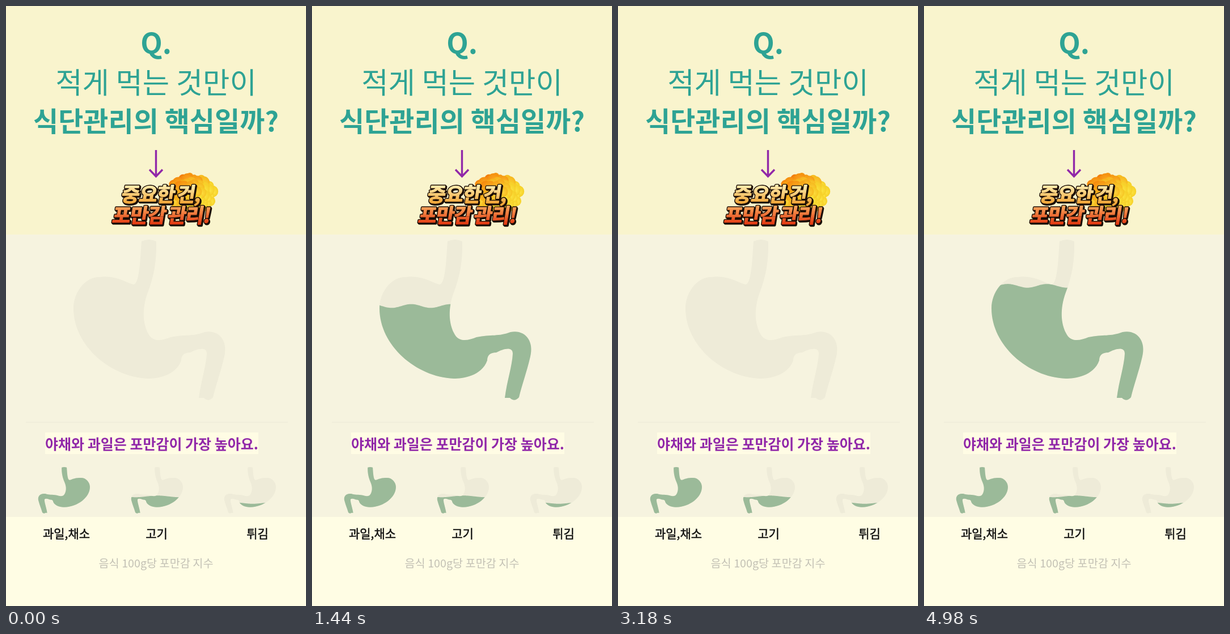
An HTML page with a canvas that plays this animation: 529 by 1058 pixels, repeating every 5.01 s.

```html
<!DOCTYPE html>
<html lang="ko">
<head>
<meta charset="utf-8">
<style>
html, body { margin: 0; width: 100%; height: 100%; overflow: hidden; background: #fffde4; }
canvas { display: block; width: 529px; height: 1058px; }
</style>
</head>
<body>
<canvas id="stage" width="529" height="1058"></canvas>
<script>
const W = 529, H = 1058, LOOP = 5010, STEP = 30;
const RESTART = 3060, PERIOD = 3150;
const ctx = document.getElementById('stage').getContext('2d');
const FONT = '"Noto Sans CJK KR", "Noto Sans CJK", "Noto Sans CJK JP", sans-serif';
const GREEN = '#9bba99', PALE = '#eeebd8', TEAL = '#2ea394', PURPLE = '#9128a9', INK = '#111';

// Oesophagus, inner bend, duodenum, underside, then back up the left wall
const stomach = new Path2D(`M239 415 Q252 409 265 415
  C266 450 260 480 250 505 C239 535 242 560 250 576
  C258 594 275 590 290 584 C315 579 330 583 350 575
  C375 570 392 590 385 618 C378 648 371 665 365 690
  Q357 699 349 691 L340 691 C344 660 353 635 354 613
  C354 600 338 604 325 611 Q309 611 309 625
  C299 653 265 657 250 657 C183 654 119 598 119 533
  C119 505 140 477 165 478 C195 474 215 490 225 491
  C236 490 237 440 239 415 Z`);

function box(g, x, y, w, h, color) {
  g.fillStyle = color;
  g.fillRect(x, y, w, h);
}

function text(g, str, y, size, weight, color, x = W / 2) {
  g.font = `${weight} ${size}px ${FONT}`;
  g.textAlign = 'center';
  g.fillStyle = color;
  g.fillText(str, x, y);
}

// Regular lettering with a hairline edge, for a medium weight
function label(g, str, x) {
  text(g, str, 938, 21, 400, INK, x);
  g.strokeStyle = INK;
  g.lineWidth = 0.5;
  g.strokeText(str, x, 938);
}

// Fills the stomach below a surface given as y(x)
function fillBelow(g, surface) {
  g.save();
  g.clip(stomach);
  g.beginPath();
  g.moveTo(100, 720);
  for (let x = 100; x <= 400; x += 2) g.lineTo(x, surface(x));
  g.lineTo(400, 720);
  g.fillStyle = GREEN;
  g.fill();
  g.restore();
}

// Small mirrored stomach; only the part left of `limit` takes the fill
function icon(g, x, surface, limit = 400) {
  g.save();
  g.translate(x + 91, 813);
  g.scale(-0.341, 0.289);
  g.translate(-119, -412);
  g.fillStyle = PALE;
  g.fill(stomach);
  g.beginPath();
  g.rect(100, 400, limit - 100, 320);
  g.clip();
  fillBelow(g, surface);
  g.restore();
}

function seeded(seed) {
  return () => (seed = seed * 16807 % 2147483647) / 2147483647;
}

// Cloud of fire: orange at the upper left, yellow at the lower right
function blast(g) {
  const rand = seeded(11), count = 70;
  for (let i = count; i > 0; i--) {
    const dist = Math.sqrt(i / count), angle = i * 2.4;
    const x = 327 + 38 * dist * Math.cos(angle), y = 332 + 32 * dist * Math.sin(angle);
    const r = 6 + 5 * rand();
    const heat = Math.max(0, Math.min(1, (x - 290) / 90 + (y - 300) / 75 + (rand() - 0.5) * 0.4));
    const hue = 26 + 23 * heat, light = 48 + 8 * heat;
    const grad = g.createRadialGradient(x + 2, y + 2, 1, x, y, r);
    grad.addColorStop(0, `hsl(${hue + 3}, 97%, ${light + 6}%)`);
    grad.addColorStop(1, `hsl(${hue}, 92%, ${light}%)`);
    g.fillStyle = grad;
    g.beginPath();
    g.arc(x, y, r, 0, 7);
    g.fill();
  }
}

// Slanted heavy lettering with a dark edge
function slogan(g, str, x, y, top, bottom) {
  const size = 35;
  g.save();
  g.translate(x, y);
  g.transform(1, 0, -0.16, 1, 0, 0);
  g.font = `900 ${size}px ${FONT}`;
  g.letterSpacing = '-1px';
  g.textAlign = 'left';
  g.lineJoin = 'round';
  g.strokeStyle = '#1b0d05';
  g.lineWidth = 4;
  for (let d = 0; d <= 2; d++) g.strokeText(str, d, d);
  const grad = g.createLinearGradient(0, -size * 0.82, 0, size * 0.06);
  grad.addColorStop(0, top);
  grad.addColorStop(1, bottom);
  g.fillStyle = g.strokeStyle = grad;
  g.lineWidth = 1.2;
  g.strokeText(str, 0, 0);
  g.fillText(str, 0, 0);
  g.restore();
}

function arrow(g) {
  g.strokeStyle = PURPLE;
  g.lineWidth = 3.4;
  g.stroke(new Path2D('M264.5 254V300M253 288.5L264.5 300.5L276 288.5'));
}

function drawBackdrop() {
  const layer = document.createElement('canvas');
  layer.width = W;
  layer.height = H;
  const g = layer.getContext('2d');
  box(g, 0, 0, W, 403, '#f9f4cd');
  box(g, 0, 403, W, 498, '#f6f3df');
  box(g, 0, 901, W, H - 901, '#fffde4');
  box(g, 35, 733, 462, 2, '#f0eddb');
  box(g, 69, 752, 376, 38, '#fffce4');

  text(g, 'Q.', 84, 50, 700, TEAL);
  text(g, '적게 먹는 것만이', 154, 51.5, 300, TEAL);
  text(g, '식단관리의 핵심일까?', 221, 48, 700, TEAL);
  arrow(g);
  blast(g);
  slogan(g, '중요한', 202, 345, '#ffeeb0', '#f2a73a');
  slogan(g, '건,', 300, 345, '#ffeeb0', '#f2a73a');
  slogan(g, '포만감', 186, 382, '#f9a55a', '#e23a12');
  slogan(g, '관리!', 284, 382, '#f9a55a', '#e23a12');

  text(g, '야채와 과일은 포만감이 가장 높아요.', 782, 25, 700, PURPLE, 257);
  label(g, '과일,채소', 106.5);
  label(g, '고기', 265.5);
  label(g, '튀김', 443.5);
  text(g, '음식 100g당 포만감 지수', 990, 19.7, 400, '#c3c1b5');

  icon(g, 57, () => 400);
  icon(g, 221, x => 591 + 5 * Math.cos((x - 137) / 36));
  icon(g, 385, x => 632 + 4 * Math.cos((x - 239) / 30), 325);

  g.fillStyle = PALE;
  g.fill(stomach);
  return layer;
}

// The liquid rises fast, slows in the middle, then speeds up: [ms, y]
const rise = [[180, 703], [960, 561], [1440, 529], [2010, 477], [2520, 406]];

function level(t) {
  const next = rise.findIndex(([time]) => time > t);
  if (next < 0) return 400;
  if (next === 0) return 720;
  const [t0, y0] = rise[next - 1], [t1, y1] = rise[next];
  return y0 + (y1 - y0) * (t - t0) / (t1 - t0);
}

const backdrop = drawBackdrop();

function draw(ms) {
  const t = ms < RESTART ? ms : ms - PERIOD;
  const y = level(t), crest = 68 - 0.0695 * t;
  ctx.drawImage(backdrop, 0, 0);
  fillBelow(ctx, x => y - 3.3 * Math.cos((x - crest) * 2 * Math.PI / 69));
}

const start = performance.now();
function tick() {
  const ms = (performance.now() - start) % LOOP;
  draw(Math.floor(ms / STEP) * STEP);
  requestAnimationFrame(tick);
}
tick();
</script>
</body>
</html>
```
